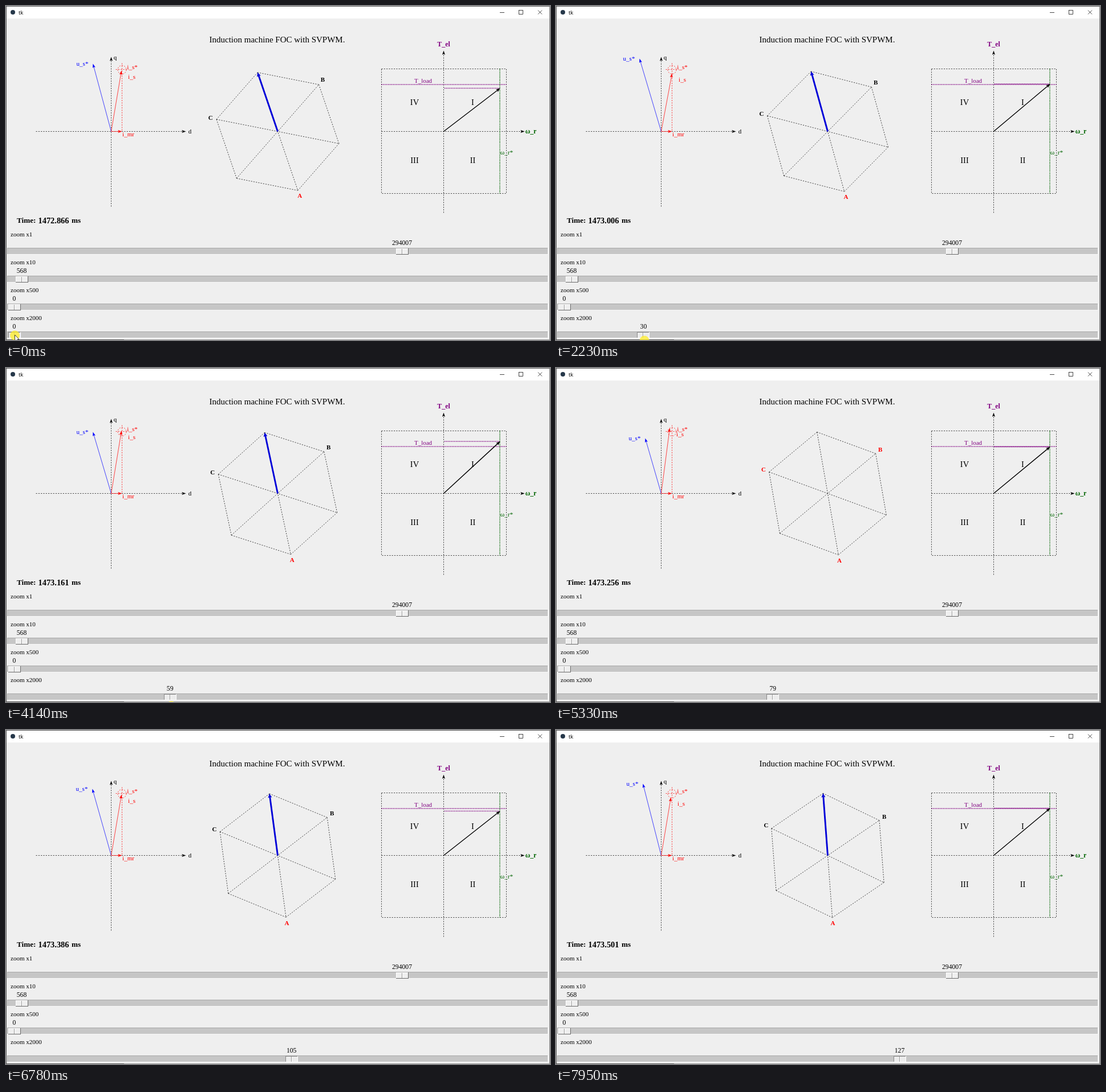
Write an HTML page with a canvas that moves like this. It is 954x587 px and loops after 8 s.

```html
<!DOCTYPE html>
<html lang="en">
<head>
<meta charset="utf-8">
<title>tk</title>
<style>
  html, body { margin: 0; width: 100%; height: 100%; overflow: hidden; background: #efefef; }
  canvas { display: block; }
</style>
</head>
<body>
<canvas id="stage" width="954" height="587"></canvas>
<script>
const ctx = document.getElementById("stage").getContext("2d");
const LOOP = 8000, RAD = Math.PI / 180;
const SERIF = '"Liberation Serif", serif';
// The window is shown at reduced scale, so strokes are fractions of a pixel
const SCALE = 0.717;
const THIN = SCALE, MEDIUM = 2 * SCALE, THICK = 4 * SCALE;
const DASH = [3 * SCALE, 3 * SCALE], DOTS = [2 * SCALE, 2 * SCALE];
const BLACK = "#000", RED = "#f00", BLUE = "#00f", PURPLE = "#800080", GREEN = "#006400";

// Drag of the fine slider: time, slider value, plotted sample, torque height, pointer height
const DRAG = [
  [0, 0, 0, 144, 579], [1090, 12, 11, 141, 583], [2230, 30, 28, 136.5, 588],
  [4140, 59, 59, 128.5, 594], [5330, 79, 78, 138, 604], [6780, 105, 104, 142, 610],
  [7950, 127, 127, 137, 610]
];

// Arrow tips in the d-q plane, one entry per control period
const VOLTAGE_X = [152, 146, 145, 146, 148, 150, 152, 155, 156, 153, 151, 150, 151, 152];
const VOLTAGE_Y = [101, 91, 90, 92, 98, 105, 112, 118, 123, 114, 103, 95, 91, 94];
const CURRENT_X = [202, 203, 203, 203, 203, 202, 202, 200, 199, 200, 202, 202, 202, 201];
const CURRENT_Y = [113, 119, 119, 118, 115, 113, 110, 107, 105, 108, 113, 116, 119, 118];

function sampleDrag(t) {
  let i = 1;
  while (i < DRAG.length - 1 && t > DRAG[i][0]) i++;
  const a = DRAG[i - 1], b = DRAG[i];
  const f = Math.min(1, (t - a[0]) / (b[0] - a[0]));
  return a.map((v, j) => v + (b[j] - v) * f);
}

function text(str, x, y, { size = 11, color = BLACK, bold = false, align = "center", family = SERIF } = {}) {
  ctx.font = `${bold ? "bold " : ""}${size}px ${family}`;
  ctx.textAlign = align;
  ctx.fillStyle = color;
  ctx.fillText(str, x, y + size * 0.33);
}

function path(points, color = BLACK, width = THIN, dash = []) {
  ctx.beginPath();
  points.forEach(([x, y]) => ctx.lineTo(x, y));
  ctx.strokeStyle = color;
  ctx.lineWidth = width;
  ctx.setLineDash(dash);
  ctx.stroke();
}

function arrow(x1, y1, x2, y2, color = BLACK, width = THIN, dash = []) {
  const angle = Math.atan2(y2 - y1, x2 - x1);
  const neck = 8 * SCALE, back = 10 * SCALE, half = 3 * SCALE + width / 2;
  path([[x1, y1], [x2 - neck * Math.cos(angle), y2 - neck * Math.sin(angle)]], color, width, dash);
  ctx.save();
  ctx.translate(x2, y2);
  ctx.rotate(angle);
  ctx.beginPath();
  [[0, 0], [-back, half], [-neck, 0], [-back, -half]].forEach(p => ctx.lineTo(...p));
  ctx.fillStyle = color;
  ctx.fill();
  ctx.restore();
}

function rect(x, y, w, h, color) {
  ctx.fillStyle = color;
  ctx.fillRect(x, y, w, h);
}

function bevel(x, y, w, h, fill, topLeft, bottomRight) {
  rect(x, y, w, h, bottomRight);
  rect(x, y, w - 1, h - 1, topLeft);
  rect(x + 1, y + 1, w - 2, h - 2, fill);
}

function drawWindow() {
  rect(0, 0, 954, 587, "#efefef");
  rect(0, 0, 954, 22, "#fff");
  rect(0, 0, 954, 1, "#555");
  rect(0, 0, 1, 587, "#555");
  rect(953, 0, 1, 587, "#777");
  ctx.beginPath();
  ctx.arc(12, 11, 4, 0, 7);
  ctx.fillStyle = "#26384a";
  ctx.fill();
  text("tk", 22, 11.5, { size: 9.5, align: "left", family: '"Open Sans", sans-serif' });
  path([[866, 11.5], [874, 11.5]]);
  ctx.strokeRect(899.5, 7.5, 7, 7);
  path([[933, 7.5], [940, 14.5]]);
  path([[940, 7.5], [933, 14.5]]);
}

function drawPhasors(k) {
  arrow(52, 220, 315, 220, BLACK, THIN, DASH);
  arrow(184, 352, 184, 89, BLACK, THIN, DASH);
  text("q", 191, 89.5);
  text("d", 322, 220);

  path([[203, 100], [203, 220]], RED, THIN, DASH);
  path([[192, 111], [214, 111]], RED, THIN, DASH);
  ctx.beginPath();
  ctx.arc(203, 111.5, 7.5, 0, 7);
  ctx.stroke();
  text("i_s*", 221, 106.5, { color: RED });

  arrow(184, 220, 203, 220, RED);
  text("i_mr", 214, 225, { color: RED });
  const ux = VOLTAGE_X[k], uy = VOLTAGE_Y[k], ix = CURRENT_X[k], iy = CURRENT_Y[k];
  arrow(184, 220, ux, uy, BLUE);
  text("u_s*", ux - 18.5, uy - 0.5, { color: BLUE });
  arrow(184, 220, ix, iy, RED);
  text("i_s", ix + 18, iy + 10.5, { color: RED });
}

// Switching state within a control period: zero vector, neighbour vector, main vector
function inverterState(k, phase, hexAngle) {
  const dx = 184 - VOLTAGE_X[k], dy = 220 - VOLTAGE_Y[k];
  const duty = Math.hypot(dx, dy) / 140;
  const lead = Math.atan2(dx, dy) - hexAngle;
  const zero = Math.round(10 * (1 - duty));
  const minor = Math.floor(10 * duty * Math.sin(Math.abs(lead)) / Math.sin(60 * RAD));
  const step = k % 2 ? 9 - phase : phase;
  if (step < zero) return { low: "ABC", turn: null };
  if (step < zero + minor) return lead > 0 ? { low: "AB", turn: 60 } : { low: "AC", turn: -60 };
  return { low: "A", turn: 0 };
}

function drawHexagon(k, phase) {
  const hexAngle = (18.8 - 1.12 * k) * RAD;
  const at = (turn, r = 109.5) => {
    const a = hexAngle + turn * RAD;
    return [476 - r * Math.sin(a), 220 - r * Math.cos(a)];
  };
  for (let turn = 0; turn < 360; turn += 60) path([at(turn), at(turn + 60)], BLACK, THIN, DASH);
  for (let turn = 0; turn < 180; turn += 60) path([at(turn), at(turn + 180)], BLACK, THIN, DASH);

  const { low, turn } = inverterState(k, phase, hexAngle);
  if (turn !== null) arrow(476, 220, ...at(turn), "#0000d8", THICK);
  [["A", 180], ["B", -60], ["C", 60]].forEach(([name, place]) => {
    const [x, y] = at(place, 120);
    text(name, x, y - 0.5, { bold: true, color: low.includes(name) ? RED : BLACK });
  });
}

function drawQuadrants(torqueY) {
  path([[658, 110], [877, 110], [877, 329], [658, 329], [658, 110]], BLACK, THIN, DASH);
  arrow(658, 220, 909, 220, BLACK, THIN, DASH);
  arrow(767, 363, 767, 78, BLACK, THIN, DASH);
  [["I", 818, 168.5], ["IV", 716, 168.5], ["III", 716, 270.5], ["II", 818, 270.5]].forEach(([name, x, y]) =>
    text(name, x, y, { size: 14.5 }));
  text("T_el", 767, 66.5, { size: 12, bold: true, color: PURPLE });
  text("ω_r", 920, 220, { size: 11.7, bold: true, color: GREEN });

  path([[658, 137.5], [877, 137.5]], PURPLE, MEDIUM, DOTS);
  text("T_load", 731, 130.5, { color: PURPLE });
  path([[865.5, 110], [865.5, 329]], GREEN, MEDIUM, DOTS);
  text("ω_r*", 877.5, 256.5, { size: 11.3, color: GREEN });
  path([[768.4, torqueY], [866, torqueY]], PURPLE, MEDIUM, DOTS);
  arrow(767, 220, 866, torqueY, BLACK, MEDIUM);
}

function drawSlider(row, label, value, center, pressed) {
  const y = 425 + 49 * row;
  text(label, 8, y - 23.5, { align: "left" });
  text(value, center, y - 8.5, { size: 11.7 });
  bevel(2, y, 949, 12, "#c6c6c6", "#a8a8a8", "#f8f8f8");
  const [light, dark] = pressed ? ["#8a8a8a", "#fff"] : ["#fff", "#6a6a6a"];
  const left = Math.round(center - 11);
  bevel(left, y + 1, 22, 11, pressed ? "#ececec" : "#efefef", light, dark);
  rect(left + 10, y + 2, 1, 9, "#9a9a9a");
  rect(left + 11, y + 2, 1, 9, "#fff");
}

function drawPointer(x, y) {
  ctx.beginPath();
  ctx.arc(x, y, 8.5, 0, 7);
  ctx.fillStyle = "rgba(255, 238, 40, 0.75)";
  ctx.fill();
  ctx.beginPath();
  [[0, 0], [0, 11], [2.5, 8.7], [4.5, 13], [6, 12.3], [4.2, 8], [7.5, 8]].forEach(([dx, dy]) =>
    ctx.lineTo(x + dx, y - 1 + dy));
  ctx.closePath();
  ctx.fillStyle = "#fff";
  ctx.fill();
  ctx.strokeStyle = BLACK;
  ctx.lineWidth = THIN;
  ctx.setLineDash([]);
  ctx.stroke();
}

function render(t) {
  const [, rawValue, rawSample, torqueY, pointerY] = sampleDrag(t);
  const value = Math.round(rawValue), sample = Math.round(rawSample);
  const k = Math.floor((sample + 3) / 10), phase = (sample + 3) % 10;

  drawWindow();
  ctx.save();
  ctx.translate(0.5, 0.5);
  drawPhasors(k);
  drawHexagon(k, phase);
  drawQuadrants(torqueY);
  ctx.restore();

  text("Induction machine FOC with SVPWM.", 475.5, 59.5, { size: 15 });
  text("Time:", 19, 377, { size: 13.2, bold: true, align: "left" });
  text((1472.866 + sample * 0.005).toFixed(3), 56.5, 377, { size: 14.4, bold: true, align: "left" });
  text("ms", 115, 377, { size: 13.2, bold: true, align: "left" });

  drawSlider(0, "zoom x1", 294007, 694.5, false);
  drawSlider(1, "zoom x10", 568, 27.5, false);
  drawSlider(2, "zoom x500", 0, 14.5, false);
  drawSlider(3, "zoom x2000", value, 14.5 + value * 4.63, true);
  rect(0, 586, 207, 1, "#555");
  rect(207, 586, 747, 1, "#999");
  if (t < 5000) drawPointer(15.5 + rawValue * 4.65, pointerY);
}

function tick(now) {
  render(now % LOOP);
  requestAnimationFrame(tick);
}
render(0);
requestAnimationFrame(tick);
</script>
</body>
</html>
```
